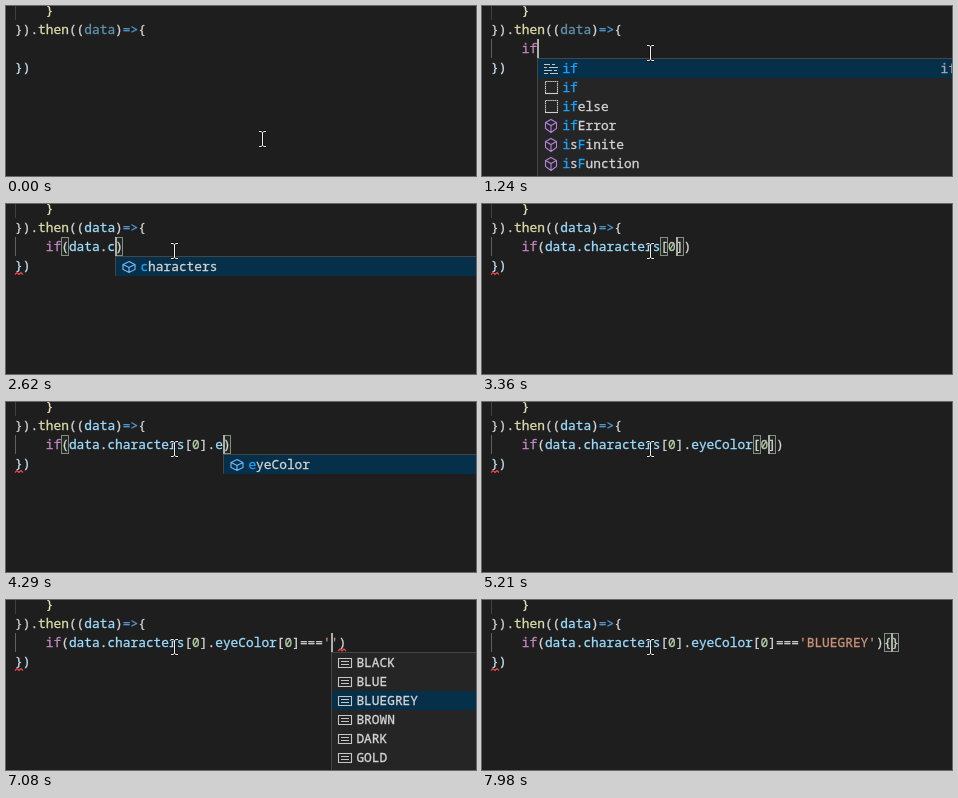
Write an HTML page that moves like this. It is 470 px wide and 170 px high and loops after 8 s.

```html
<!DOCTYPE html>
<html>
<head>
<meta charset="utf-8">
<style>
html, body { margin: 0; width: 100%; height: 100%; overflow: hidden; background: #1e1e1e; }
svg { display: block; }
text { font: 12.833px "Noto Sans Mono", "DejaVu Sans Mono", monospace; white-space: pre; stroke-width: .3; }
path, rect { fill: none; }
.icon { stroke-width: 1.1; }
.err { stroke: #f14c4c; stroke-width: 1.1; }
</style>
</head>
<body>
<svg width="470" height="170" viewBox="0 0 470 170">
  <path d="M9.5 0V14" stroke="#404040"/>
  <g id="code"></g>
  <g id="mouse">
    <path d="M-3 -7.5H-1L.5 -6.5 2 -7.5H4M.5 -6.5V6.5M-3 7.5H-1L.5 6.5 2 7.5H4" stroke="#111" stroke-width="2.4"/>
    <path d="M-3 -7.5H-1L.5 -6.5 2 -7.5H4M.5 -6.5V6.5M-3 7.5H-1L.5 6.5 2 7.5H4" stroke="#f0f0f0"/>
  </g>
</svg>
<script>
const LOOP = 8000, CHAR = 7.7, LEFT = 9, ROW = 19, LINE = 33;
const COLORS = { kw: '#c586c0', fn: '#dcdcaa', arrow: '#569cd6', id: '#9cdcfe', num: '#b5cea8', str: '#ce9178', op: '#d4d4d4' };

const ICONS = {
  kw: ['#c5c5c5', 'M1 3.5h6M9 3.5h3M1 6.5h3M6 6.5h9M1 9.5h8M11 9.5h3M1 12.5h4M7 12.5h8'],
  snip: ['#d0d0d0', 'M2.5 13.5v-12h12v12', 'M2 13.5h13'],
  cube: ['#b180d7', 'M8 1.5l5.5 3v6l-5.5 4-5.5-4v-6zM2.5 4.5l5.5 3 5.5-3M8 7.5v7'],
  field: ['#75beff', 'M8 2.5l6 3v5l-6 3-6-3v-5zM2 5.5l6 3 6-3M8 8.5v5'],
  vari: ['#75beff', 'M4 3.5H1.5v9H4M12 3.5h2.5v9H12M8 5l3 1.5v3L8 11 5 9.5v-3zM5 6.5L8 8l3-1.5'],
  wrench: ['#c5c5c5', 'M14 4.5a3.8 3.8 0 0 1-5 4.5l-5 5-2-2 5-5a3.8 3.8 0 0 1 4.5-5L9.5 4.5 11.5 6.5z'],
  value: ['#c5c5c5', 'M1.5 3.5h13v9h-13zM4 6.5h8M4 9.5h8']
};

const LISTS = {
  ifs: 'kw:if snip:if snip:ifelse cube:ifError cube:isFinite cube:isFunction',
  data: 'wrench:data vari:DataCue vari:DataTransfer vari:DataTransferItem vari:DataTransferItemList vari:DataView',
  chars: 'field:characters',
  eye: 'field:eyeColor',
  eyes: 'value:BLACK value:BLUE value:BLUEGREY value:BROWN value:DARK value:GOLD'
};

// [start ms, text before caret, text after caret, list, selected row]
const A = 'if(data.characters', B = A + '[0].eyeColor', C = B + '[0]';
const STEPS = [
  [0, null],
  [780, ''],
  [930, '    '],
  [1090, 'i'],
  [1240, 'if', '', 'ifs'],
  [1390, 'if(', ')'],
  [1550, 'if(d', ')'],
  [1700, 'if(da', ')', 'data'],
  [1850, 'if(dat', ')', 'data'],
  [1980, 'if(data', ')', 'data'],
  [2310, 'if(data.', ')'],
  [2460, 'if(data.', ')', 'chars'],
  [2610, 'if(data.c', ')', 'chars'],
  [2760, 'if(data.ch', ')', 'chars'],
  [2910, A, ')'],
  [3060, A + '[', '])'],
  [3210, A + '[0', '])'],
  [3510, A + '[0]', ')'],
  [3820, A + '[0].', ')'],
  [3980, A + '[0].', ')', 'eye'],
  [4290, A + '[0].e', ')', 'eye'],
  [4450, A + '[0].ey', ')', 'eye'],
  [4600, B, ')'],
  [4910, B + '[', '])'],
  [5060, B + '[0', '])'],
  [5360, C, ')'],
  [5680, C + '=', ')'],
  [5840, C + '==', ')'],
  [5990, C + '===', ')'],
  [6300, C + "==='", "')"],
  [6460, C + "==='", "')", 'eyes', 0],
  [6760, C + "==='", "')", 'eyes', 1],
  [6920, C + "==='", "')", 'eyes', 2],
  [7220, C + "==='BLUEGREY", "')"],
  [7530, C + "==='BLUEGREY'", ')'],
  [7830, C + "==='BLUEGREY')", ''],
  [7980, C + "==='BLUEGREY'){", '}']
];

const code = document.getElementById('code'), mouse = document.getElementById('mouse');
const colX = n => LEFT + n * CHAR;
const esc = s => s.replace(/>/g, '&gt;');
const span = (s, color) => `<tspan fill="${color}" stroke="${color}">${esc(s)}</tspan>`;
const text = (x, y, body) => `<text x="${x}" y="${y}">${body}</text>`;
const squiggle = (x, y) => `<path class="err" d="M${x} ${y}l2-2 2 2 2-2 2 2"/>`;

function tokens(line) {
  return line.replace(/'[^']*'?|\w+|=>|[^\w']/g, s => {
    const kind = s[0] === "'" ? 'str' : /^\d/.test(s) ? 'num' : s === 'if' ? 'kw'
      : s === 'then' ? 'fn' : s === '=>' ? 'arrow' : /^\w/.test(s) ? 'id' : 'op';
    return span(s, COLORS[kind]);
  });
}

function pairAt(line, i) {
  const c = line[i], k = c ? '([{)]}'.indexOf(c) : -1;
  if (k < 0) return null;
  const dir = k < 3 ? 1 : -1, mate = '([{)]}'[(k + 3) % 6];
  for (let j = i, depth = 0; j >= 0 && j < line.length; j += dir) {
    depth += line[j] === c ? 1 : line[j] === mate ? -1 : 0;
    if (!depth) return [i, j];
  }
  return null;
}

function label(word, typed) {
  let k = 0;
  return [...word].map(c => {
    const hit = k < typed.length && c.toLowerCase() === typed[k].toLowerCase();
    if (hit) k++;
    return span(c, hit ? '#18a3ff' : '#d4d4d4');
  }).join('');
}

function popup(name, x, typed, sel = 0) {
  const rows = LISTS[name].split(' '), left = Math.round(x);
  const height = rows.length > 1 ? 228 : 19;
  let out = `<rect x="${left + .5}" y="52.5" width="430" height="${height}" style="fill:#252526" stroke="#454545"/>
    <rect x="${left + 1}" y="${53 + sel * ROW}" width="429" height="${ROW}" style="fill:#062f4a"/>`;
  rows.forEach((row, i) => {
    const [kind, word] = row.split(':'), [color, shape, base = ''] = ICONS[kind];
    const dash = base && 'stroke-dasharray="1.5 .6"';
    out += `<g class="icon" stroke="${color}" transform="translate(${left + 6} ${55 + i * ROW})"><path d="${shape}" ${dash}/><path d="${base}"/></g>`;
    out += text(left + 25.4, 67 + i * ROW, label(word, typed));
  });
  if (name === 'ifs') out += text(458.5, 67, span('if', '#a0a8b0'));
  return out;
}

function draw([ms, before, after = '', list, sel]) {
  let out = text(colX(4), 9, span('}', '#e8e0b8'));
  const head = tokens('}).then((data)=>{');
  out += text(LEFT, 28, ms < 2310 ? head.replaceAll(COLORS.id, '#5f94ad') : head);
  out += text(LEFT, 66, span('})', '#c4e0f0'));
  if (before !== null) {
    const typed = before.trim() ? '    ' + before : before;
    const line = typed + after, at = typed.length, x = colX(at);
    if (at) out += '<path d="M9.5 33V52" stroke="#606060"/>';
    const pair = pairAt(line, at - 1) || pairAt(line, at) || [];
    for (const i of pair)
      out += `<rect x="${Math.round(colX(i)) + .5}" y="${LINE + .5}" width="7" height="18" style="fill:#1e2a1e" stroke="#888"/>`;
    out += text(LEFT, 47, tokens(line));
    if (ms >= 1700) out += squiggle(9, 70.5);
    if (ms >= 1700 && ms < 2310) out += squiggle(63, 51);
    if (after === "')") out += squiggle(Math.round(colX(line.length - 1)), 51);
    out += `<rect x="${Math.round(x)}" y="${LINE}" width="2" height="19" style="fill:#aeafad"/>`;
    if (list) out += popup(list, x, before.match(/\w*$/)[0], sel);
  }
  code.innerHTML = out;
}

let shown;
function frame(now) {
  const t = now % LOOP;
  const step = STEPS.findLast(s => s[0] <= t);
  if (step !== shown) draw(shown = step);
  // The pointer glides to the empty line in sampled steps.
  const k = Math.max(0, Math.min(4, Math.floor((t - 150) / 155) + 1)) / 4;
  const ease = k * k * (3 - 2 * k);
  mouse.setAttribute('transform', `translate(${Math.round(256 - 88 * ease)} ${Math.round(133 - 86 * ease)})`);
  requestAnimationFrame(frame);
}
requestAnimationFrame(frame);
</script>
</body>
</html>
```
